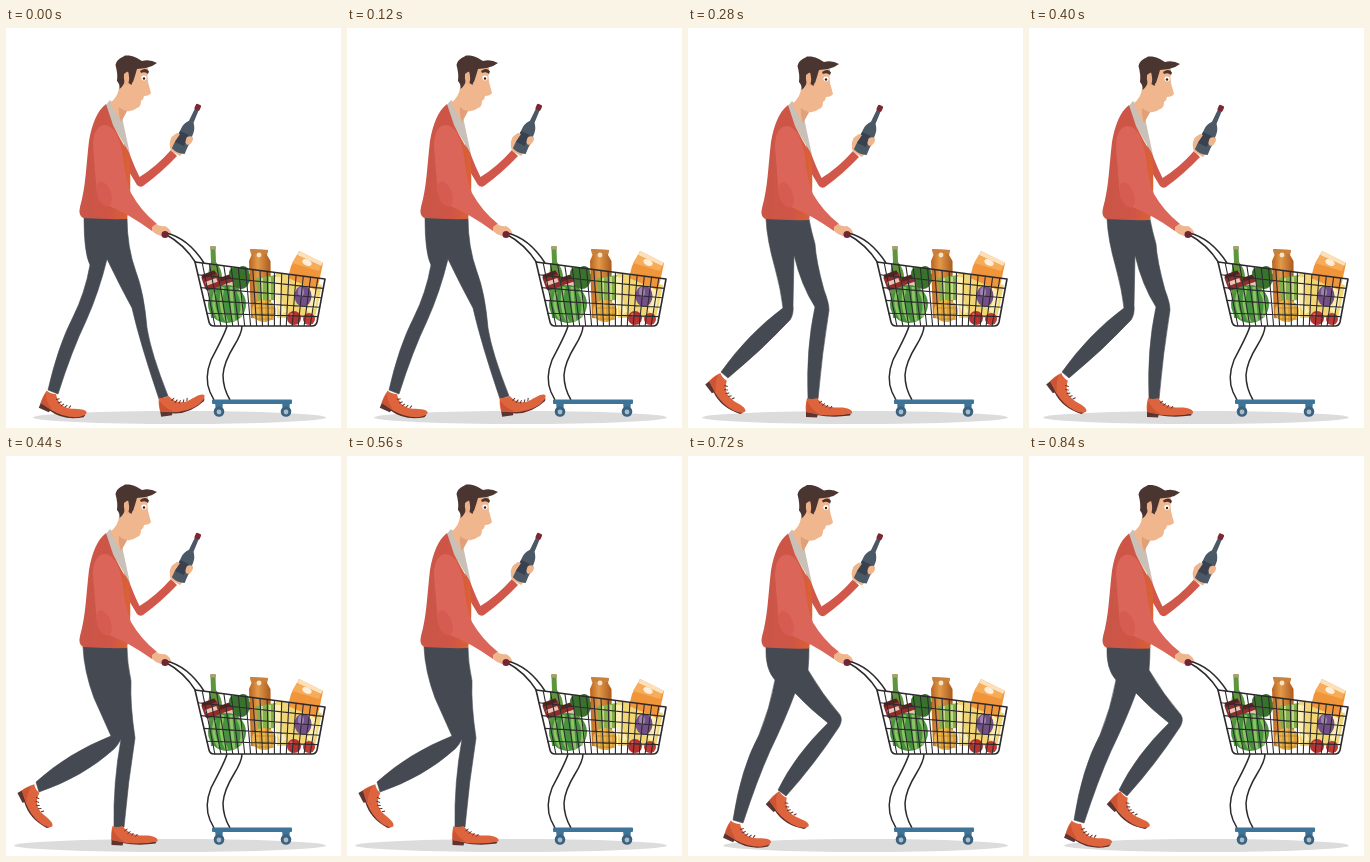
Animation, 335 px wide and 400 px high, one loop 0.88 s. Source, as an HTML page:

```html
<!DOCTYPE html>
<html lang="en">
<head>
<meta charset="utf-8">
<title>Shopper with a cart</title>
<style>
  html, body { margin: 0; width: 100%; height: 100%; overflow: hidden; background: #fff; }
  svg { display: block; width: 100vw; height: 100vh; }
</style>
</head>
<body>
<svg viewBox="0 0 335 400" xmlns="http://www.w3.org/2000/svg">
  <defs>
    <linearGradient id="knit" x1="0" x2="1">
      <stop offset="0" stop-color="#c95648"/>
      <stop offset=".6" stop-color="#cf5546"/>
      <stop offset="1" stop-color="#dc6233"/>
    </linearGradient>
    <linearGradient id="box" x1="0" x2="1">
      <stop offset="0" stop-color="#b9651f"/>
      <stop offset=".4" stop-color="#e39a4a"/>
      <stop offset="1" stop-color="#a9581c"/>
    </linearGradient>
    <g id="flat">
      <path d="M0 12L0 18L11 18.500L12 15Z" fill="#5a3531"/>
      <path d="M0 13Q22 18 45 14.500L44 16.500Q26 19 11 16Z" fill="#5a302a"/>
      <path d="M1 -1Q5 1 11 -1C17 7 25 9 34 8.500C42 8.500 47 11 46 14.500Q28 18 12 15.500L0 13Q-1 7 1 -1Z" fill="#de643e"/>
      <path d="M1 2Q4 9 13 15L0 13Z" fill="#ca5433"/>
      <path d="M13 4l3-2M16 6.500l3-2M20 8.500l2-2.500M24 9.500l2-2.500" stroke="#5a302a" fill="none"/>
    </g>
    <g id="bent">
      <path d="M0 12L0 18L11 18.500L12 15Z" fill="#5a3531"/>
      <path d="M0 13Q26 20 46 7L45 10Q28 21 11 16.500Z" fill="#5a302a"/>
      <path d="M1 -1Q5 1 11 -1C16 7 23 9 31 6.500C38 4 45 1 46.500 5Q46 9 38 13Q26 18 12 15.500L0 13Q-1 7 1 -1Z" fill="#de643e"/>
      <path d="M1 2Q4 9 13 15L0 13Z" fill="#ca5433"/>
      <path d="M13 4l3-2M16 6.500l3-2.500M20 8l2-3M24 8l1.500-3M28 7l1-3" stroke="#5a302a" fill="none"/>
    </g>
  </defs>

  <ellipse id="shadow" cy="389.500" ry="6.500" fill="#dcdcdc"/>

  <g id="farArm">
    <path d="M118 108Q124 130 133.500 149Q150 139 165 122L171 128Q155 145 137 158Q134 160 131 157L119 137Z" fill="#d2574b"/>
    <path d="M165 123Q162 114 166 109L171 105L177 108L186 108Q188 112 184 116L174 128Z" fill="#efb68e"/>
    <g transform="translate(193 76.500) rotate(24)">
      <path d="M-2 4L2 4L2.500 19Q6.500 24 6.500 29L7 51Q0 54 -7 51L-6.500 29Q-6.500 24 -2.500 19Z" fill="#4b5866"/>
      <path d="M-6.500 32H3V44H-6.500Z" fill="#38414d"/>
      <rect x="-2.800" y="0" width="5.600" height="6" rx="1.500" fill="#7c2732"/>
    </g>
    <path d="M181 109Q187 107 187 111Q186 116 181 117Q178 114 181 109ZM165 110Q170 104 174 106Q171 111 168 114Z" fill="#efb68e"/>
  </g>

  <path id="pants" fill="#454a52" stroke="#454a52" stroke-width=".6" stroke-linejoin="round"/>
  <use id="backShoe"/>
  <use id="frontShoe"/>

  <g id="torso">
    <path d="M104 72L99 78L106 96L124 126L119 103L115 84Z" fill="#c9c0b7"/>
    <path d="M100 76C91 83 86 96 83 113C80 138 80 158 74 179Q72 187 77 190Q100 191.500 121 191C125 172 125 148 123 126Q114 111 107 97Z" fill="url(#knit)"/>
    <path d="M113 60L120 44C128 38 138 37 142 40Q141 48 142 54L145 65Q143 68 138 68Q138 71 135 73Q135 79 131 80Q126 84 121 83L115 94L104 75Q112 69 113 60Z" fill="#f0b68e"/>
    <path d="M121 83Q116 82 113 79Q112 85 115 94L121 83Z" fill="#dfa07a"/>
    <path d="M109.500 37C111 31 115 30 119 27.500C127 27 131 30 136 33Q144 31 151 35Q146 39 140 40L131 41Q129 48 127 54L122 54L120 48Q119 57 113.500 61Q114 56 111 53Q112 46 109.500 37Z" fill="#4b3530"/>
    <path d="M118 46Q123 41 125 46Q126 54 122 58Q117 55 118 46Z" fill="#edb088"/>
    <path d="M125 42Q129 50 125.500 57L122.500 55Q124 50 122 43Z" fill="#4b3530"/>
    <path d="M134 43Q140 39 143 43.500L142 46Q139 43 135 45Z" fill="#4b3530"/>
    <ellipse cx="138" cy="50" rx="2.600" ry="2.400" fill="#fff"/>
    <circle cx="138" cy="50.500" r="1.200" fill="#2c2523"/>
  </g>

  <path id="nearArm" fill="#dc655a"/>
  <ellipse id="elbow" cx="98" cy="166" rx="7" ry="13" transform="rotate(-20 98 166)" fill="#d65c51"/>
  <path d="M146 199L150 196Q155 199 159 198Q165 201 165 206Q160 209 155 208Q150 207 146 203Z" fill="#efb68e"/>

  <g id="cart">
    <g id="food">
      <path d="M204.500 221L209.500 221L210 234Q216 241 216 250V290H205L202 255Q202 240 205 234Z" fill="#5e963e"/>
      <rect x="204" y="218" width="6" height="3.500" rx="1" fill="#a8a070"/>
      <g id="jars"></g>
      <g id="broccoli" fill="#39722d"></g>
      <path d="M244 221L262 222L261 227L264.500 233L265 292L245 290L243 233L245.500 227Z" fill="url(#box)"/>
      <path d="M244 221L262 222L261 226H245Z" fill="#c9813c"/>
      <circle cx="253" cy="227" r="2.400" fill="#f6e3c8"/>
      <path d="M250 250L270 247L268 272L252 274Z" fill="#83ae48"/>
      <path d="M256 250V274M264 249V272" stroke="#c3d98a" stroke-width="2"/>
      <path d="M270 246Q280 244 287 250L316 257L309 290L271 290Z" fill="#f1d673"/>
      <path d="M272 249Q269 270 278 285M305 258Q311 274 303 284" stroke="#fbeeb5" stroke-width="6" fill="none"/>
      <path d="M293 223L317 235L313 254L310 262L282 250L285 238Z" fill="#f0953a"/>
      <path d="M293 223L317 234.500L315 238L291 227Z" fill="#fbe0ba"/>
      <path d="M291 227L315 238L313 243L286 235Z" fill="#f6ac58"/>
      <ellipse cx="301" cy="234.500" rx="5" ry="3" transform="rotate(25 301 234.500)" fill="#fdeedb"/>
      <ellipse cx="297" cy="268" rx="8.500" ry="10.500" fill="#74508a"/>
      <ellipse cx="295" cy="264" rx="3" ry="5" fill="#a084b0"/>
      <circle cx="221" cy="276" r="19" fill="#46923f"/>
      <path d="M209 264Q205 278 213 291M217 259Q212 278 221 294M225 259Q226 278 228 293M232 263Q239 276 234 289" stroke="#8cc463" stroke-width="3" fill="none"/>
      <ellipse cx="258" cy="283" rx="12" ry="11" fill="#ecb54a"/>
      <path d="M249 280H269M248 286H270M251 291H268M254 274V293M260 272V294M266 275V292" stroke="#c78927"/>
      <circle cx="288" cy="290" r="7" fill="#b53232"/>
      <circle cx="303" cy="291" r="6" fill="#c33a35"/>
      <circle cx="286" cy="287" r="2" fill="#dc6a5c"/>
    </g>
    <g fill="none" stroke="#2d2a2d">
      <path id="wires" stroke-width="1.100"/>
      <path d="M189 234L319 251L311 294Q310 298 306 298H208Q204 298 203 294Z" stroke-width="1.600" stroke-linejoin="round"/>
      <path d="M159 206Q178 216 190 235M160 205Q182 210 198 235M221 298C219 306 210 322 205 332Q198 350 204 364L208 372M236 298Q236 305 228 318Q218 334 217 347Q217 360 224 372" stroke-width="1.500"/>
    </g>
    <circle cx="159" cy="206.500" r="3.500" fill="#702638"/>
    <g id="wheels"></g>
    <rect x="206" y="371.500" width="80" height="4.500" rx="1" fill="#3d7497"/>
  </g>
</svg>
<script>
  const $ = id => document.getElementById(id);
  const LOOP = 880;

  // shoes: x, y, angle of the ankle; left: shadow's left edge; dy: body drop
  const poses = [
    { at: 0, dy: 0, left: 27, back: [39.5, 363, 22], front: [152, 371, -10],
      pants: "M78 190Q78 225 84 237Q79 265 67 289Q52 318 42 362L52 366Q66 322 80 293Q93 264 101 231Q114 258 126 280Q134 315 153 371L162 368Q145 325 141 300Q138 265 130 244Q121 219 121 190Z" },
    { at: 160, dy: 6.5, left: 1, back: [25, 353, 40], front: [135, 371, 0],
      pants: "M79 196Q77 240 76 281Q48 307 26 353L34 358Q58 329 87 289Q91 252 99 216Q120 252 145 278Q137 318 138 371L148 371Q152 325 159 285Q160 277 155 271Q138 251 128 230Q120 216 122 196Z" },
    { at: 280, dy: 1, left: 14, back: [31, 345, 50], front: [118, 371, 0],
      pants: "M78 191Q79 212 87 240Q93 262 95 280Q60 306 33 344L40 350Q74 322 102 292Q106 286 105 277L106 227Q113 257 127 279Q118 320 120 371L130 371Q134 325 141 282Q141 275 136 262Q128 233 127 216Q123 202 121 191Z" },
    { at: 440, dy: 1, left: 8, back: [27, 328, 60], front: [105.5, 371, 0],
      pants: "M77 191Q78 215 88 242L105 280Q62 297 30 326L33 336Q77 321 108 293Q112 289 115 283Q107 327 108 371L118 371Q122 326 129 282Q124 249 125 225Q121 206 121 191Z" },
    { at: 600, dy: 1, left: 47, back: [65, 331, 52], front: [92, 371, 0],
      pants: "M77 191Q77 215 101 235Q105 263 102 294Q82 309 66 331L73 338Q95 324 112 303Q127 291 142 275Q145 270 142 265Q128 247 120 230Q119 210 121 191ZM102 235Q103 290 94 371L105 371Q107 330 112 298Q117 272 118 240ZM118.500 258L131 269L115.500 281Z" },
    { at: 720, dy: 1.5, left: 35, back: [41.5, 365, 21], front: [90, 335, 43],
      pants: "M78 191Q77 213 87 224Q82 252 71 279Q53 312 45 364L55 367Q69 324 82 295Q97 264 107 237Q122 253 140 267Q107 299 90 334L98 340Q126 309 151 271Q155 264 152 259Q134 238 120 214Q121 203 121 191Z" }
  ];

  const circles = list => list.map(([x, y, r]) => `<circle cx="${x}" cy="${y}" r="${r}"/>`).join("");
  const jar = (x, y) => `<g transform="translate(${x} ${y}) rotate(-20)">
    <rect x="-8" y="-8" width="16" height="16" rx="3" fill="#8f2d2d"/>
    <rect x="-7" y="-9" width="14" height="4" fill="#542421"/>
    <rect x="-6" y="-1" width="12" height="4" fill="#e6c5b4"/></g>`;
  const wheel = x => `<path d="M${x - 4} 374H${x + 4}L${x + 3} 384H${x - 3}Z" fill="#3d7497"/>
    <circle cx="${x}" cy="383.500" r="5.300" fill="#3b6380"/>
    <circle cx="${x}" cy="384" r="2.400" fill="#a9bcc8"/>`;

  $("jars").innerHTML = jar(205, 253) + jar(223, 256);
  $("broccoli").innerHTML = circles([[229, 245, 6], [237, 244, 6], [241, 250, 5], [235, 253, 8]]);
  $("wheels").innerHTML = wheel(213) + wheel(280);

  function wires() {
    const mix = (a, b, k) => (a + (b - a) * k).toFixed(1);
    let d = "";
    for (let i = 1; i < 18; i++) {
      const k = i / 18;
      d += `M${mix(189, 319, k)} ${mix(234, 251, k)}L${mix(203, 310, k)} 298`;
    }
    for (let i = 1; i < 5; i++) {
      const k = i / 5;
      d += `M${mix(189, 203, k)} ${mix(234, 298, k)}L${mix(319, 310, k)} ${mix(251, 298, k)}`;
    }
    return d;
  }
  $("wires").setAttribute("d", wires());

  // The shoulder drops with the body while the hand stays on the handle.
  function armPath(dy) {
    const y = v => v + dy;
    return `M98 ${y(97)}Q87 ${y(99)} 87 ${y(118)}L90 ${y(156)}Q90 ${y(171)} 101 ${y(177)}` +
      `Q123 ${186 + dy * .7} 146 203L151 196Q135 ${183 + dy * .4} 125 ${y(165)}` +
      `Q119 ${y(150)} 117 ${y(128)}Q112 ${y(97)} 98 ${y(97)}Z`;
  }

  function place(id, [x, y, turn]) {
    $(id).setAttribute("href", turn ? "#bent" : "#flat");
    $(id).setAttribute("transform", `translate(${x} ${y}) rotate(${turn})`);
  }

  let shown;
  function draw(t) {
    const pose = poses.filter(p => p.at <= t % LOOP).pop();
    if (pose === shown) return;
    shown = pose;
    const { dy, left } = pose;
    const drop = `translate(0 ${dy})`;
    $("torso").setAttribute("transform", drop);
    $("farArm").setAttribute("transform", drop);
    $("elbow").setAttribute("transform", drop + " rotate(-20 98 166)");
    $("nearArm").setAttribute("d", armPath(dy));
    $("pants").setAttribute("d", pose.pants);
    $("shadow").setAttribute("cx", (left + 320) / 2);
    $("shadow").setAttribute("rx", (320 - left) / 2);
    place("backShoe", pose.back);
    place("frontShoe", pose.front);
  }

  const start = performance.now();
  function tick() {
    draw(Math.max(0, performance.now() - start));
    requestAnimationFrame(tick);
  }
  tick();
</script>
</body>
</html>
```
